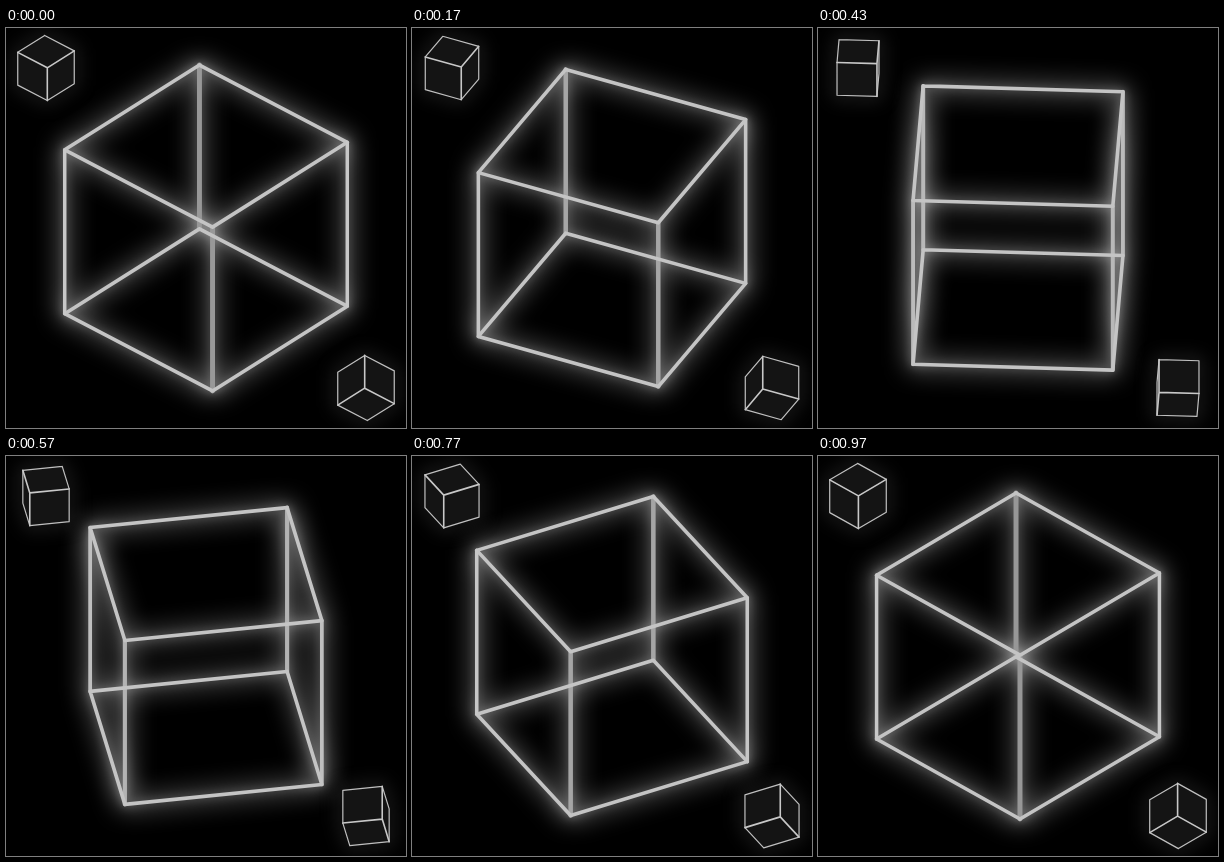
An HTML page with a canvas that plays this animation: 400 by 400 pixels, repeating every 1010 ms.

```html
<!DOCTYPE html>
<html>
<head>
<meta charset="utf-8">
<style>
  html, body { margin: 0; width: 100%; height: 100%; overflow: hidden; background: #000; }
  canvas { display: block; }
</style>
</head>
<body>
<canvas id="stage" width="400" height="400"></canvas>
<script>
const ctx = document.getElementById('stage').getContext('2d');
const LOOP = 1010, STEPS = 30, TILT = 35 * Math.PI / 180;

// [step, degrees turned]
const KEYS = [[0, 2.65], [5, 19.1], [10, 33.3], [13, 42.1], [17, 55], [23, 73], [29, 90.8]];

// Edges as pairs of corners: 0-3 top (back, right, front, left), 4-7 below them
const TOP = [[0, 1], [1, 2], [2, 3], [3, 0]];
const BOTTOM = [[4, 5], [5, 6], [6, 7], [7, 4]];
const POSTS = [[0, 4], [1, 5], [2, 6], [3, 7]];
const RIM = [[3, 0], [0, 1], [1, 5], [5, 6], [6, 7], [7, 3]];
const NEAR = [[2, 1], [2, 3], [2, 6]];
const FAR = [[4, 5], [4, 7], [4, 0]];

function turnAt(step) {
  const i = KEYS.findIndex(k => k[0] >= step);
  if (i === 0) return KEYS[0][1];
  const [s0, a0] = KEYS[i - 1], [s1, a1] = KEYS[i];
  return a0 + (a1 - a0) * (step - s0) / (s1 - s0);
}

function corners(cx, cy, size, turn) {
  const r = size / Math.SQRT2, h = size / 2 * Math.cos(TILT);
  // keep corner 0 the rearmost one
  const first = (135 - turn) % 90 - 45;
  return Array.from({ length: 8 }, (_, i) => {
    const a = (first + 90 * (i % 4)) * Math.PI / 180;
    return [cx + r * Math.sin(a), cy - r * Math.cos(a) * Math.sin(TILT) + (i < 4 ? -h : h)];
  });
}

function stroke(pts, edges, width, color, blur = 0) {
  ctx.filter = blur ? `blur(${blur}px)` : 'none';
  ctx.lineWidth = width;
  ctx.strokeStyle = color;
  ctx.beginPath();
  for (const [a, b] of edges) {
    ctx.moveTo(...pts[a]);
    ctx.lineTo(...pts[b]);
  }
  ctx.stroke();
  ctx.filter = 'none';
}

function bigCube(turn) {
  const pts = corners(200, 200, 200, turn);
  const all = [...TOP, ...BOTTOM, ...POSTS];
  ctx.globalCompositeOperation = 'lighter';
  stroke(pts, all, 6, '#c0c0c0', 12);
  stroke(pts, all, 4, '#404040', 4);
  ctx.globalCompositeOperation = 'lighten';
  // posts look softer towards the middle
  for (const post of POSTS) {
    const side = Math.abs(pts[post[0]][0] - 200) / 141.4;
    const g = 150 + 50 * side;
    stroke(pts, [post], 5 - 1.5 * side, `rgb(${g},${g},${g})`, 0.5);
  }
  stroke(pts, [...TOP, ...BOTTOM], 3.6, '#c4c4c4');
  ctx.globalCompositeOperation = 'source-over';
}

function smallCube(cx, cy, turn, inner) {
  const pts = corners(cx, cy, 40, turn);
  stroke(pts, RIM, 4, '#484848', 9);
  ctx.beginPath();
  for (const [a] of RIM) ctx.lineTo(...pts[a]);
  ctx.fillStyle = '#141414';
  ctx.fill();
  stroke(pts, RIM, 1.2, '#c0c0c0');
  stroke(pts, inner, 1.6, '#c8c8c8');
}

function draw(now) {
  const t = Math.floor(now % LOOP / 10) * 10;
  const step = Math.min(STEPS - 1, Math.floor((t + 4) * 0.03));
  const turn = turnAt(step);
  ctx.fillStyle = '#000';
  ctx.fillRect(0, 0, 400, 400);
  ctx.lineCap = 'round';
  bigCube(turn);
  smallCube(40, 40, turn, NEAR);
  smallCube(360, 360, turn, FAR);
}

const start = performance.now();
function tick() {
  draw(performance.now() - start);
  requestAnimationFrame(tick);
}
tick();
</script>
</body>
</html>
```
